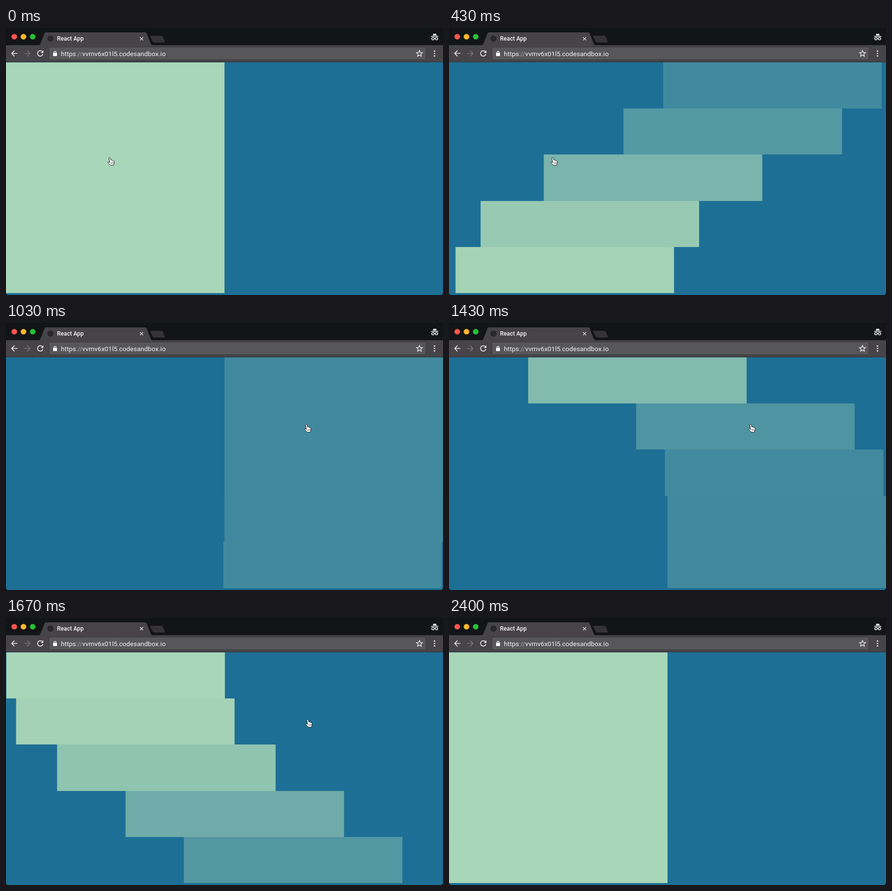
These frames come from a looping animation (900 by 551 pixels, 2.43 s). An HTML page:

```html
<!DOCTYPE html>
<html lang="en">
<head>
<meta charset="utf-8">
<title>Trail</title>
<style>
  html, body { margin: 0; width: 100%; height: 100%; overflow: hidden; background: #0b0b0d; }
  svg { display: block; width: 900px; height: 551px; }
  text { font-family: Roboto, sans-serif; fill: #f4f4f5; }
  .line { fill: none; stroke: #e8e8ea; stroke-width: 1.7; }
</style>
</head>
<body>
<svg viewBox="0 0 900 551">
  <path d="M0 70H900V546Q900 551 895 551H5Q0 551 0 546Z" fill="#1d6f95"/>
  <g id="rows" fill="#a8d6b8"></g>

  <g id="browser">
    <path d="M0 36V5Q0 0 5 0H895Q900 0 900 5V36Z" fill="#131417"/>
    <rect y="35.5" width="900" height="35" fill="#464448"/>
    <rect y="69.5" width="900" height="1" fill="#333236"/>
    <path d="M68 36Q70 35 71 32L79 12Q80 9 83 9H286Q289 9 290 12L298 32Q299 35 301 36Z" fill="#464448"/>
    <path d="M299 16H320Q322 16 323 18L327 28Q328 30 326 30H305Q303 30 302 28L297 18Q296 16 299 16Z" fill="#353236"/>
    <circle cx="17" cy="18" r="5.8" fill="#ff5550"/>
    <circle cx="36" cy="18" r="5.8" fill="#fdb62c"/>
    <circle cx="55" cy="18" r="5.8" fill="#27c036"/>
    <circle cx="91.5" cy="22" r="6.5" fill="#29292c"/>
    <text x="105" y="26" font-size="12" font-weight="500">React App</text>
    <path class="line" d="M276 19l6.4 6.4M282.400 19l-6.4 6.4" style="stroke-width:1.3"/>

    <g fill="#f0f0f2">
      <path d="M879 15.500L880.300 11.500Q883 12.500 885.700 11.500L887 15.500ZM875.500 16.500H890.500V18H875.500Z"/>
      <g fill="none" stroke="#f0f0f2" stroke-width="1.4">
        <circle cx="879.300" cy="22" r="2.500"/><circle cx="886.700" cy="22" r="2.500"/>
        <path d="M881.800 21.500Q883 20.800 884.200 21.500"/>
      </g>
    </g>

    <rect x="88.500" y="39.500" width="776" height="26" rx="3" fill="#575659" stroke="#3b3a3e"/>
    <path class="line" d="M23.500 52.500H12M17.500 46.700L11.700 52.500L17.500 58.300"/>
    <path class="line" d="M37.500 52.500H49M43.500 46.700L49.300 52.500L43.500 58.300" style="stroke:#727176"/>
    <path class="line" d="M74.600 48.500A5.600 5.600 0 1 0 76 54"/>
    <path d="M77 46V51.500H71.500Z" fill="#e8e8ea"/>
    <rect x="97" y="51.300" width="8" height="6.700" rx="1" fill="#fff"/>
    <path class="line" d="M98.800 52V50.300a2.200 2.200 0 0 1 4.400 0V52" style="stroke:#fff;stroke-width:1.3"/>
    <text x="113" y="57.500" font-size="13.600">https<tspan fill="#a9a9ad">://</tspan>vvmv6x01l5.codesandbox.io</text>
    <path class="line" d="M851.500 46.300L853.300 50.500L857.700 50.900L854.300 53.800L855.400 58.200L851.500 55.800L847.600 58.200L848.700 53.800L845.300 50.900L849.700 50.500Z" style="stroke-width:1.4"/>
    <g fill="#e8e8ea">
      <circle cx="882.500" cy="47.500" r="1.600"/><circle cx="882.500" cy="52.500" r="1.600"/><circle cx="882.500" cy="57.500" r="1.600"/>
    </g>
  </g>

  <g id="hand" stroke="#111" stroke-linejoin="round">
    <path d="M-1 1.600C-1 0 1.600 -.2 2 1.500L3.200 6C4 5 5.600 5.300 5.900 6.400C6.700 5.700 7.900 6.100 8.200 7.200C9.200 6.900 10 7.600 10 9L9.600 12.400L8.600 16.300H2.400L-2.800 11.200C-3.800 9.700 -2.200 8.600 -1 9.500L.6 10.600Z" fill="#fff"/>
    <path d="M3.200 10l.5 3.500M5.400 9.900l.4 3.500M7.500 9.800l.2 3.500" stroke-width=".7"/>
  </g>
  <path id="arrow" d="M0 0V13.500L3.200 10.600L5.200 15.300L7.600 14.300L5.600 9.800H9.800Z" fill="#000" stroke="#fff" stroke-width="1.100"/>
</svg>

<script>
const LOOP = 2430, FRAME = 100 / 3, ROWS = 5;
const CLICKS = [191, 1337];
const OMEGA = 22.3, ZETA = 0.95, LAG = 6;
const $ = id => document.getElementById(id);

// Each row is a spring that chases the row above it, in 1 ms steps.
const trail = [];
for (let i = 0; i < ROWS; i++) {
  const values = [];
  let pos = 0, vel = 0;
  for (let t = 0; t < LOOP; t++) {
    const target = i ? trail[i - 1][t - LAG] ?? 0 : +(t >= CLICKS[0] && t < CLICKS[1]);
    values.push(pos);
    vel += (OMEGA * OMEGA * (target - pos) - 2 * ZETA * OMEGA * vel) / 1000;
    pos += vel / 1000;
  }
  trail.push(values);
}

const edge = i => Math.round(70.75 + i * 95.25);
const bars = trail.map((_, i) => {
  const bar = document.createElementNS('http://www.w3.org/2000/svg', 'rect');
  bar.setAttribute('y', edge(i));
  bar.setAttribute('width', 450);
  bar.setAttribute('height', edge(i + 1) - edge(i));
  return $('rows').appendChild(bar);
});

const ramp = (t, from, to) => Math.min(1, Math.max(0, (t - from) / (to - from)));
const smooth = u => u * u * (3 - 2 * u);

function drawCursor(t) {
  const move = smooth(ramp(t, 520, 970));
  const x = 213 + 405 * move + 2.5 * ramp(t, 1030, 1200);
  const y = 267 - 58 * move;
  const overBackground = move > 0 && x < 450;
  const show = (id, on) => {
    $(id).setAttribute('transform', `translate(${x} ${y})`);
    $(id).setAttribute('visibility', on ? 'visible' : 'hidden');
  };
  show('hand', !overBackground && t < 1900);
  show('arrow', overBackground);
}

function draw(now) {
  // The picture advances at 30 frames per second, on 10 ms ticks.
  const step = Math.floor((now % LOOP + 7) / FRAME);
  const t = Math.round(step * FRAME / 10) * 10 % LOOP;
  bars.forEach((bar, i) => {
    const p = trail[i][t];
    bar.setAttribute('x', 450 * p);
    bar.setAttribute('opacity', 1 - 0.75 * p);
  });
  drawCursor(t);
  requestAnimationFrame(() => draw(performance.now()));
}
draw(0);
</script>
</body>
</html>
```
